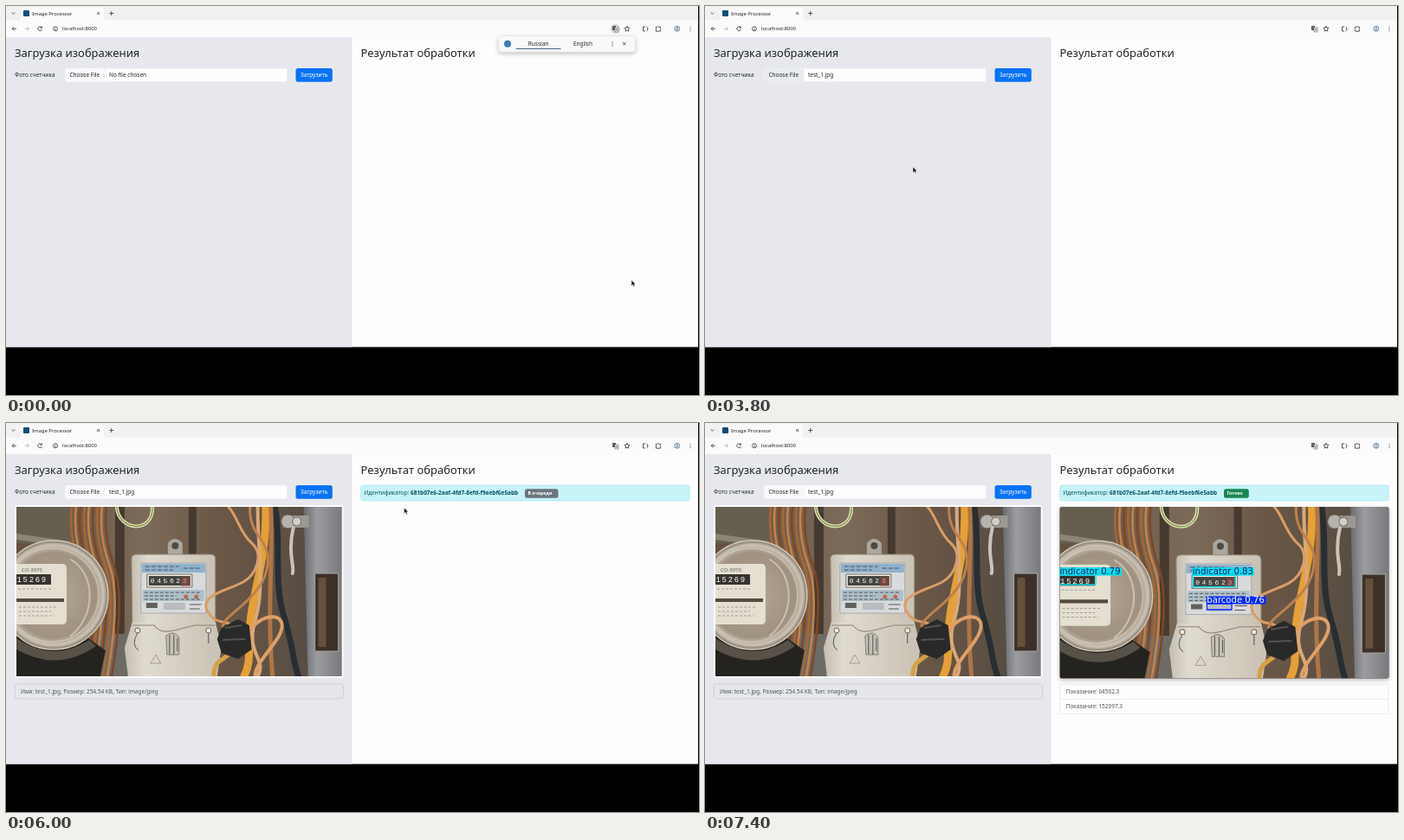
Write an HTML page that moves like this. It is 800 px wide and 450 px high and loops after 8 s.

```html
<!DOCTYPE html>
<html lang="ru">
<head>
<meta charset="utf-8">
<title>Image Processor</title>
<style>
html, body { margin: 0; width: 100%; height: 100%; overflow: hidden; background: #000; }
svg { display: block; }
#stage { width: 100vw; height: 100vh; }
text { font: 6.46px "Noto Sans", "Open Sans", sans-serif; fill: #212529; }
.small { font-size: 5.9px; }
.head { font-size: 12.9px; font-weight: 500; }
.white { fill: #fff; }
.bold { font-weight: 700; }
.badge { font-size: 5.2px; font-weight: 700; fill: #fff; }
.teal { fill: #055160; }
.grey { fill: #50555a; }
.label { font: 10.1px "DejaVu Sans", sans-serif; fill: #111f68; }
.line { fill: none; stroke: #45474a; stroke-width: .9; }
.wire { fill: none; stroke-linecap: round; }
</style>
</head>
<body>
<svg id="stage" viewBox="0 0 800 450">
  <defs>
    <linearGradient id="wall"><stop offset="0" stop-color="#65503e"/><stop offset=".4" stop-color="#7c6b59"/><stop offset=".62" stop-color="#6b5746"/><stop offset="1" stop-color="#504942"/></linearGradient>
    <linearGradient id="post"><stop offset="0" stop-color="#686a6d"/><stop offset=".35" stop-color="#9b9da0"/><stop offset="1" stop-color="#77797c"/></linearGradient>
    <linearGradient id="case"><stop offset="0" stop-color="#c5beb1"/><stop offset=".2" stop-color="#e0dbd0"/><stop offset="1" stop-color="#c9c1b3"/></linearGradient>
    <radialGradient id="glass"><stop offset="0" stop-color="#b3a796"/><stop offset=".78" stop-color="#a09280"/><stop offset=".92" stop-color="#cbc3b6"/><stop offset="1" stop-color="#817565"/></radialGradient>
    <filter id="soft" x="-10%" y="-20%" width="120%" height="150%"><feDropShadow dx="0" dy="2" stdDeviation="2.5" flood-opacity=".25"/></filter>
    <clipPath id="round"><rect x="409.5" y="97" width="380" height="198.5" rx="2.5"/></clipPath>

    <symbol id="photo" viewBox="12 97 376 196" preserveAspectRatio="none">
      <rect x="12" y="97" width="376" height="196" fill="url(#wall)"/>
      <path d="M12 97h62v42H12z" fill="#665f50"/>
      <path d="M12 128 74 137v6L12 135z" fill="#8d8676"/>
      <path d="M126 97h11v150h-11zM211 97h9v60h-9z" fill="#463a30"/>
      <path d="M110 244h38v49h-38z" fill="#6d6b66"/>
      <g id="copper" class="wire" stroke-width="2.6"></g>
      <path class="wire" d="M128 97C130 126 171 128 169 97" stroke="#e4dfbd" stroke-width="4"/>
      <path class="wire" d="M128 97C130 126 171 128 169 97" stroke="#799743" stroke-width="1.3"/>

      <path d="M12 247H92L115 263 109 293H12z" fill="#25231f"/>
      <circle cx="55" cy="199" r="63" fill="url(#glass)" stroke="#d2c9bb" stroke-width="1.5"/>
      <circle cx="53" cy="199" r="54" fill="none" stroke="#ded3c0" stroke-width="1.2" opacity=".7"/>
      <path d="M12 163H65Q70 163 70 168V228Q70 233 64 233H12z" fill="#e5dfd1"/>
      <text x="18" y="172" class="grey" style="font-size:6px">СО-3070</text>
      <path d="M12 175H52V187H12z" fill="#37332f"/>
      <text x="12.5" y="184.5" class="white" style="font:9px 'Liberation Mono',monospace;letter-spacing:1.7px">15269</text>
      <path d="M12 203H67V207H12z" fill="#544a40"/>
      <path class="line" d="M14 192h40M15 213h43M15 218h37M15 223h41" stroke-dasharray="3 2" opacity=".5"/>
      <path class="wire" d="M75 158C104 175 104 223 75 246" stroke="#eee4d0" stroke-width="2" opacity=".55"/>
      <path d="M12 249Q55 278 96 251L104 258Q60 289 12 262z" fill="#575148"/>

      <path d="M187 153V139Q195 129 204 139V153z" fill="#a9a79f"/>
      <circle cx="195.5" cy="142" r="4" fill="#51483e"/>
      <path d="M145 157Q145 152 151 152H237Q242 152 242 158V237H146z" fill="url(#case)" stroke="#8f877c"/>
      <path d="M146 230H242L249 259 244 293H141L137 260z" fill="url(#case)"/>
      <path class="wire" d="M147 234H171Q178 244 194 240T218 234H241" stroke="#8c8376" stroke-width="1.1"/>
      <path d="M156 162H231V220H156z" fill="#d8dadb" stroke="#92969a" stroke-width=".7"/>
      <path d="M157 163H230V173H157z" fill="#8fb1cc"/>
      <path class="line" d="M161 166h39M161 170h32M205 168h21" stroke-dasharray="5 2" stroke-width="1.2"/>
      <path d="M163 175H215V190H163z" fill="#f2eee6" stroke="#6c6964"/>
      <path d="M165 177H213V188H165z" fill="#454441"/>
      <text x="167" y="185.5" class="white" style="font:8px 'Liberation Mono',monospace;letter-spacing:2.6px">045623</text>
      <path d="M202 178H213V189H202z" fill="#a5493b" opacity=".45"/>
      <path d="M158 193H229V206H158z" fill="#aebfc9"/>
      <path class="line" d="M160 196h65M160 200h37M160 204h65" stroke-dasharray="4 2"/>
      <circle cx="208" cy="201" r="2.5" fill="#b86c48"/>
      <circle cx="220" cy="201" r="2.5" fill="#b86c48"/>
      <path d="M182 208H207V216H182z" fill="#b8bbc0"/>
      <path d="M162 208h13v6h-13z" fill="#62615e"/>
      <path class="line" d="M212 210h14M212 215h12"/>
      <g fill="#eee9dd" stroke="#6b6357"><circle cx="152" cy="240" r="3"/><circle cx="234" cy="240" r="3"/></g>
      <path class="line" d="M152 243Q144 256 153 263M234 243v12"/>
      <path d="M185 246Q194 239 200 248V268H186z" fill="#c5c0b5" stroke="#847c70"/>
      <path class="line" d="M189 245v22M194 245v23M198 249v15" stroke-width="1.4"/>
      <path d="M173 268 179 278H167z" fill="none" stroke="#968d80" stroke-width=".8"/>

      <path d="M344 97H388V293H349z" fill="url(#post)"/>
      <path d="M357 174H384V264H357z" fill="#3c3028" stroke="#aaa69f"/>
      <path d="M361 179H370V259H361z" fill="#65503c"/>
      <path d="M320 107h30v14h-30z" fill="#9b9992"/>
      <circle cx="326" cy="114" r="8" fill="#b5b3ab" stroke="#65615b"/>
      <circle cx="336" cy="114" r="5" fill="#d1cec5" stroke="#716b62"/>
      <g class="wire">
        <path d="M311 97C318 137 309 185 321 223S330 270 338 293" stroke="#282e32" stroke-width="7"/>
        <path d="M332 121C325 151 334 166 331 174" stroke="#c8c3b5" stroke-width="4"/>
        <path d="M300 97C302 151 288 186 283 224S285 274 275 293" stroke="#e5a037" stroke-width="9"/>
        <path d="M306 97C309 159 301 208 308 293" stroke="#af7545" stroke-width="5"/>
        <path d="M291 97C290 139 300 188 288 228S302 272 291 293" stroke="#d9a978" stroke-width="4"/>
        <path d="M257 97C267 107 270 127 284 139S290 175 274 184 222 199 233 218 257 224 264 239" stroke="#d99d68" stroke-width="3"/>
        <path d="M282 97C280 134 310 134 301 171S245 224 251 238" stroke="#bd814e" stroke-width="3"/>
        <path d="M280 245C288 223 318 217 319 234S286 277 288 293" stroke="#df9f68" stroke-width="4"/>
        <path d="M240 293C240 274 251 275 259 266" stroke="#d4a146" stroke-width="5"/>
      </g>
      <path d="M249 237 268 227 281 234 284 262 268 273 249 266 244 250z" fill="#292929"/>
      <path class="wire" d="M254 237 272 234M251 251 276 250" stroke="#55534f" stroke-width="2"/>
    </symbol>
  </defs>

  <!-- Browser window -->
  <rect width="799" height="394.5" fill="#fdfdfd"/>
  <rect width="799" height="17" fill="#f1f1f2"/>
  <path d="M14 17Q17 17 17 13V5Q17 1.5 21 1.5H109Q113 1.5 113 5V13Q113 17 116 17z" fill="#fbfbfb"/>
  <rect y="16.5" width="799" height="20" fill="#fbfbfb"/>
  <rect y="36" width="399.5" height="358.5" fill="#e6e8ee"/>
  <path class="line" d="M6.7 7.5 8.5 9.3 10.3 7.5M105 7l3 3m0-3-3 3M119.2 8.5h5m-2.5-2.5v5"/>
  <rect x="20" y="5" width="7" height="7" rx="1" fill="#114f76"/>
  <text x="30" y="10.6" class="small">Image Processor</text>
  <path class="line" d="M12 26.3H7.2M9.4 24 7.1 26.3 9.4 28.6"/>
  <path class="line" d="M21.8 26.3H26.6M24.4 24 26.7 26.3 24.4 28.6" stroke="#b5b7ba" style="stroke:#b5b7ba"/>
  <path class="line" d="M41 24.7A2.4 2.4 0 1 0 41.5 27M41.4 23.5V25.3H39.5"/>
  <circle class="line" cx="57" cy="26.3" r="2.5" stroke-width=".7"/>
  <path class="line" d="M57 26v1.7M57 24.7v.5" stroke-width=".7"/>
  <text x="65" y="28.4" class="small">localhost:8000</text>
  <circle id="halo" cx="703.5" cy="26.3" r="5.5" fill="#d4d6d9"/>
  <path d="M700 23h4v5h-4z" fill="#55585c"/>
  <path d="M703 25h4v5h-4z" fill="#fff" stroke="#55585c" stroke-width=".6"/>
  <path class="line" d="M701 24.5h2M702 24v2M704 28.8l1-2.5 1 2.5" stroke-width=".6" style="stroke:#777a7e"/>
  <path class="line" d="M717 23.2 717.9 25.3 720.1 25.5 718.4 27 718.9 29.2 717 28 715.1 29.2 715.6 27 713.9 25.5 716.1 25.3z" stroke-width=".7"/>
  <path class="line" d="M738 24h-2.5v5h2.5M739.5 24l1.2 1v3l-1.2 1"/>
  <path class="line" d="M750.3 24.3h1.5q.8-1.8 1.6 0h2v1.6q1.4.6 0 1.3v2h-5.1v-1.5q1.2-.9 0-1.7z"/>
  <g fill="none" stroke="#4d6f95" stroke-width=".8"><circle cx="774.8" cy="26.3" r="3"/><circle cx="774.8" cy="25.5" r="1"/><path d="M772.8 28.3q2-1.5 4 0"/></g>
  <g fill="#45474a"><circle cx="790" cy="24" r=".6"/><circle cx="790" cy="26.3" r=".6"/><circle cx="790" cy="28.6" r=".6"/></g>

  <!-- Upload form -->
  <text x="10" y="59.3" class="head">Загрузка изображения</text>
  <text x="409.5" y="59.3" class="head">Результат обработки</text>
  <text x="10" y="82.3">Фото счетчика</text>
  <rect id="glow" x="67.5" y="71.2" width="257.8" height="17.3" rx="3" fill="#a9d1f2"/>
  <rect x="68.5" y="72.2" width="255.8" height="15.3" rx="2" fill="#fdfdfd"/>
  <path id="choose" d="M70.5 72.2H113.7V87.5H70.5Q68.5 87.5 68.5 85.5V74.2Q68.5 72.2 70.5 72.2z"/>
  <path d="M113.7 72.2V87.5" stroke="#e1e4e8" stroke-width=".5"/>
  <text x="73.5" y="82.3">Choose File</text>
  <text id="file" x="119" y="82.3"></text>
  <rect id="button" x="334.5" y="72" height="15.8" rx="2.5"/>
  <text x="340" y="82.3" class="white">Загрузить</text>
  <path id="spinner" d="M377.2 78.2A2.6 2.6 0 1 0 377.2 81.8" fill="none" stroke="#fff" stroke-width="1.1"/>

  <g id="preview">
    <rect x="10" y="95" width="379.5" height="200" rx="2.5" fill="#fdfdfd"/>
    <use href="#photo" x="12" y="97" width="375.6" height="196"/>
    <rect x="10.3" y="302" width="379.2" height="17" rx="2.5" fill="#e5e7ec" stroke="#bfc2c8" stroke-width=".6"/>
    <text x="17" y="312.8" class="grey">Имя: test_1.jpg, Размер: 254.54 KB, Тип: image/jpeg</text>
  </g>

  <!-- Processing result -->
  <g id="queue">
    <rect x="409.6" y="72" width="379.6" height="18" rx="2.5" fill="#c7f3f9" stroke="#9ce5ef" stroke-width=".6"/>
    <text x="413.3" y="83.3" class="teal">Идентификатор:</text>
    <text x="467" y="83.3" class="teal bold">681b07e6-2aaf-4fd7-8efd-f9aebf6e5abb</text>
    <rect id="badge" x="599" y="76.2" height="10.5" rx="2.5"/>
    <text id="status" x="602.5" y="83.3" class="badge"></text>
  </g>
  <g id="result">
    <rect x="409.5" y="97" width="380" height="198.5" rx="2.5" fill="#655" filter="url(#soft)"/>
    <g clip-path="url(#round)">
      <use href="#photo" x="409.5" y="97" width="380" height="198.5"/>
      <g fill="none" stroke="#0bdbeb" stroke-width="1.4"><path d="M409 176H451V187H409z"/><path d="M563 176H612V189.5H563z"/></g>
      <path d="M579.5 209H608V216H579.5z" fill="none" stroke="#042aff" stroke-width="1.4"/>
      <path d="M409 167H481V176.5H409zM562.3 167H634V176.5H562.3z" fill="#0bdbeb"/>
      <path d="M578.8 200.5H647.5V209.5H578.8z" fill="#042aff"/>
      <text x="409.5" y="175" class="label">indicator 0.79</text>
      <text x="562.8" y="175" class="label">indicator 0.83</text>
      <text x="579.3" y="208.3" class="label" style="fill:#fff">barcode 0.76</text>
    </g>
    <path d="M409.8 302.5H789V336.5H409.8zM409.8 319.5H789" fill="#fdfdfd" stroke="#dfe2e6" stroke-width=".6"/>
    <text x="416.7" y="313" class="grey">Показание: 04562.3</text>
    <text x="416.7" y="330" class="grey">Показание: 152697.3</text>
  </g>

  <g id="popup">
    <rect x="568.5" y="34.5" width="158" height="18.5" rx="4" fill="#f9f9fa" stroke="#d3d5d8" stroke-width=".4" filter="url(#soft)"/>
    <circle cx="579" cy="43.7" r="4" fill="#3d78bb"/>
    <text x="602.8" y="46">Russian</text>
    <text x="655" y="46">English</text>
    <path d="M588.5 49.5H640.5" stroke="#456487" stroke-width="1.1"/>
    <g fill="#45474a"><circle cx="700" cy="41.3" r=".65"/><circle cx="700" cy="43.6" r=".65"/><circle cx="700" cy="45.9" r=".65"/></g>
    <path class="line" d="M712 41.9l3.5 3.5m0-3.5-3.5 3.5"/>
  </g>

  <g id="cursor" stroke="#fff" stroke-width=".5" fill="#171717">
    <path id="arrow" d="M0 0V6.8L1.6 5.4 2.7 7.8 4 7.2 2.9 4.9H5z"/>
    <path id="hand" d="M0 0Q1-.7 1.4.4V2.6L4 3Q4.8 3.3 4.6 4.5L4 7.3H.8L-1.8 4.3Q-1.4 3.2 0 4.2z"/>
  </g>
</svg>
<script>
const $ = id => document.getElementById(id);
const show = (id, on) => { $(id).style.display = on ? '' : 'none'; };
const set = (id, attrs) => { for (const k in attrs) $(id).setAttribute(k, attrs[k]); };

const LOOP = 8000, STEP = 200;
// time, x, y of the pointer tip
const route = [[0, 722, 317], [200, 540, 286], [400, 342, 252], [800, 342, 252],
  [1800, 91, 75.5], [2000, 91, 76.5], [3200, 240, 186], [4000, 240, 186],
  [4800, 350, 80.5], [5800, 350, 80.5], [6600, 788, 150], [LOOP, 788, 150]];

let wires = '';
for (let i = 0; i < 9; i++) {
  const x = 76 + i * 5;
  const color = ['#a66634', '#c48249', '#7c4727'][i % 3];
  wires += `<path d="M${x} 97Q${x - 4} 130 ${x + 9} 166T${x + 6} 293" stroke="${color}"/>`;
}
$('copper').innerHTML = wires;

function pointer(t) {
  const i = route.findIndex(p => p[0] > t);
  const [t0, x0, y0] = route[i - 1], [t1, x1, y1] = route[i];
  const k = (t - t0) / (t1 - t0);
  return [x0 + (x1 - x0) * k, y0 + (y1 - y0) * k];
}

function draw(t) {
  const loading = t >= 5000 && t < 5400, done = t >= 7200;
  show('popup', t < 1600);
  show('halo', t < 1600);
  show('preview', t >= 4000);
  show('queue', t >= 5400);
  show('result', done);
  show('spinner', loading);
  show('glow', t >= 4000 && t < 5200);
  set('glow', { opacity: t < 4800 ? 1 : .65 });
  set('choose', { fill: t >= 2000 && t < 4000 ? '#e9ebef' : '#f8f9fa' });
  set('button', { width: loading ? 50 : 42.3, fill: loading ? '#4990e5' : '#0972f5' });
  set('spinner', { transform: `rotate(${(t - 5000) * .48} 375.2 80)` });
  set('badge', { width: done ? 28.8 : 38.5, fill: done ? '#198754' : '#6c757d' });
  $('file').textContent = t < 3800 ? 'No file chosen' : 'test_1.jpg';
  $('status').textContent = done ? 'Готово' : 'В очереди';

  const [x, y] = pointer(t);
  const hand = y > 72 && y < 88 && (x > 68 && x < 114 || x > 334 && x < 377);
  set('cursor', { transform: `translate(${x} ${y})` });
  show('cursor', t < 6600);
  show('hand', hand);
  show('arrow', !hand);
}

let start;
function tick(now) {
  start ??= now;
  draw(Math.floor((now - start) % LOOP / STEP) * STEP);
  requestAnimationFrame(tick);
}
requestAnimationFrame(tick);
</script>
</body>
</html>
```
